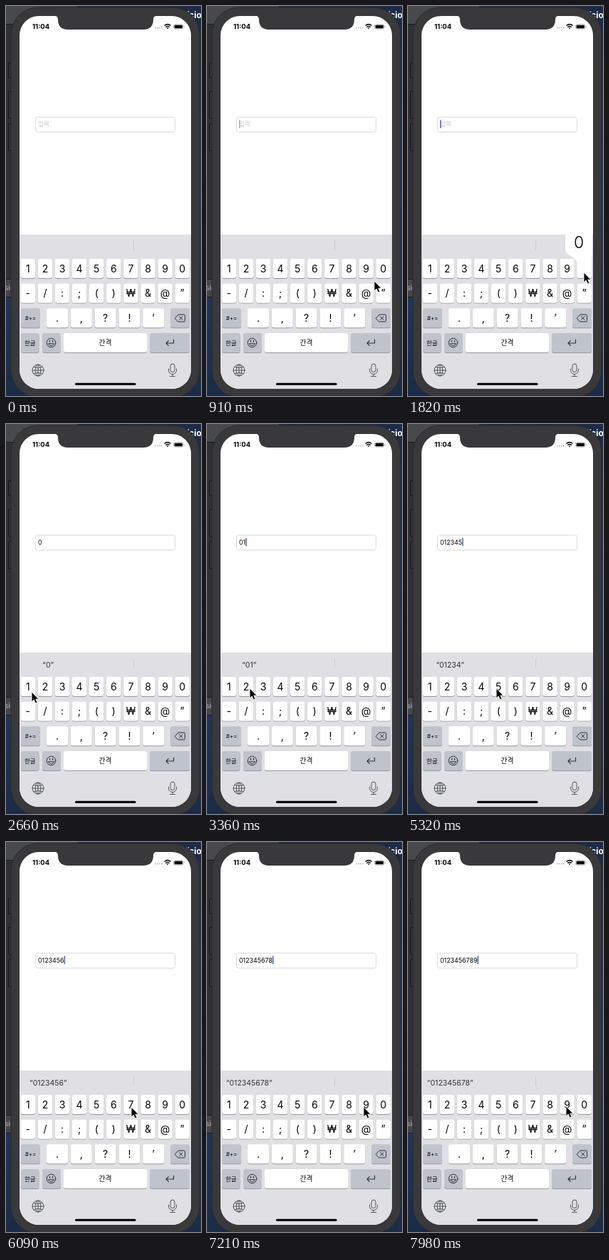
Write an HTML page that moves like this. It is 274 px wide and 546 px high and loops after 8 s.

```html
<!DOCTYPE html>
<html lang="ko">
<head>
<meta charset="utf-8">
<title>Keyboard input</title>
<style>
  html, body { margin: 0; width: 100%; height: 100%; overflow: hidden; background: #1e2d49; }
  svg { display: block; width: 274px; height: 546px; }
  text { font-family: Inter, "Noto Sans CJK KR", "Noto Sans CJK", sans-serif; fill: #050505; }
  .mid { text-anchor: middle; }
  .line { fill: none; stroke: #303236; stroke-linecap: round; stroke-linejoin: round; }
</style>
</head>
<body>
<svg viewBox="0 0 274 546">
  <defs>
    <linearGradient id="desk" x2="0" y2="1">
      <stop offset="0" stop-color="#1d2a48"/><stop offset=".5" stop-color="#28406a"/><stop offset="1" stop-color="#1b2b47"/>
    </linearGradient>
    <clipPath id="screen"><rect x="19" y="14" width="241" height="522" rx="27"/></clipPath>
  </defs>

  <!-- desktop and window behind the phone -->
  <rect width="274" height="546" fill="url(#desk)"/>
  <rect width="100" height="408" fill="#303133"/>
  <rect width="100" height="25" fill="#48494b"/>
  <path d="M0 25.5H20M0 382.5H20M0 407.5H20" stroke="#18191b"/>
  <rect y="383" width="20" height="24" fill="#45464a"/>
  <text x="-2" y="398" font-size="10" style="fill:#b9babc">sig</text>
  <text x="254" y="17" font-size="12" font-weight="700" style="fill:#fff">ício</text>

  <!-- phone body -->
  <g fill="#333436" stroke="#111214">
    <rect x="3.5" y="79.5" width="6" height="21" rx="1"/>
    <rect x="3.5" y="119.5" width="6" height="38" rx="1"/>
    <rect x="3.5" y="164.5" width="6" height="38" rx="1"/>
  </g>
  <rect x="7" y="2" width="265" height="546" rx="38" fill="#39393b" stroke="#29292b"/>

  <g clip-path="url(#screen)">
    <rect x="19" y="14" width="241" height="522" fill="#fff"/>
    <path d="M67 13C72 14 73 16 73 19C73 28 78 33 87 33H193C202 33 207 28 207 19C207 16 208 14 213 13Z" fill="#39393b"/>
    <text x="37" y="32" font-size="9.5" font-weight="700">11:04</text>
    <path d="M209 30.5h11" stroke="#aaa" stroke-width="1.5" stroke-dasharray="1.5 1.5"/>
    <g fill="none" stroke="#111" stroke-width="1.5">
      <path d="M222.5 27.5Q227 23.8 231.5 27.5M224.3 29.6Q227 27.4 229.7 29.6"/>
      <path d="M227 30.3v1.7"/>
    </g>
    <rect x="235.5" y="25.8" width="13.5" height="6.4" rx="2" fill="none" stroke="#999" stroke-width=".7"/>
    <rect x="236.6" y="26.8" width="11.3" height="4.4" rx="1" fill="#000"/>
    <path d="M250 28v2" stroke="#999"/>

    <rect x="41.5" y="155.5" width="196" height="21" rx="3" fill="#fff" stroke="#dcdcde"/>
    <text id="placeholder" x="45" y="168" font-size="8.5" style="fill:#c5c5c8">입력</text>
    <text id="typed" x="45" y="168.6" font-size="8.9"></text>
    <rect id="caret" y="159.5" width="1.5" height="11.5" fill="#4964c8"/>

    <rect x="19" y="320" width="241" height="216" fill="#e0e0e4"/>
    <path d="M179.5 328v14" stroke="#cbccd0"/>
    <text id="suggestion" class="mid" x="59.3" y="340.5" font-size="10.5" style="fill:#333437"></text>
    <g id="keys"></g>

    <g class="line">
      <path d="M237.5 437l4.5-5h8q1.500 0 1.500 1.500v7q0 1.500-1.500 1.500h-8zM243.500 434.700l4.600 4.600m0-4.600l-4.600 4.600"/>
      <path d="M235.500 467v5H225m3.300-3.300L225 472l3.300 3.300" stroke-width="1.200"/>
      <circle cx="63.500" cy="471.500" r="6.300"/>
      <path d="M59.500 473Q63.500 479 67.500 473Z"/>
      <path d="M61.500 468.500v1.500M65.500 468.500v1.500" stroke-width="1.300"/>
      <g stroke="#55575c">
        <circle cx="45" cy="510" r="8"/>
        <ellipse cx="45" cy="510" rx="3.800" ry="8"/>
        <path d="M45 502v16M37 510h16M39 505.500q6 2.500 12 0M39 514.500q6-2.500 12 0"/>
        <rect x="231" y="501" width="6" height="11.500" rx="3"/>
        <path d="M228.500 508v2a5.500 5.500 0 0 0 11 0v-2M234 515.500v3M230.500 518.500h7"/>
      </g>
    </g>
    <rect x="97" y="527.800" width="85.500" height="3" rx="1.500" fill="#000"/>

    <g id="popup">
      <path id="bubble" fill="#fff"/>
      <text id="bubbleDigit" class="mid" y="339" font-size="23" font-weight="300"></text>
    </g>
  </g>
  <path id="cursor" d="M0 0V14L3.200 11.100L5.500 16L8 14.900L5.800 10.200H10Z" fill="#000" stroke="#fff" stroke-width=".9"/>
</svg>

<script>
const LOOP = 8000, STEP = 70, HOLD = 140, SUGGEST_DELAY = 250;
const $ = id => document.getElementById(id);

// Key-down time of each digit 0-9
const presses = [1750, 2800, 3430, 4200, 4620, 5180, 5670, 6230, 6790, 7770];

// Pointer path: time, x, y
const pointer = [
  [0, 290, 400], [770, 290, 400], [910, 235, 385], [980, 210, 376],
  [1120, 210, 376], [1260, 262, 374], [1400, 247, 373], [2030, 247, 373],
  [2380, 50, 376], [2660, 36, 375], [2940, 36, 374], [3010, 60, 370],
  [3640, 60, 370], [3850, 83, 372], [4270, 83, 372], [4410, 98, 368],
  [4830, 98, 368], [4970, 124, 370], [5390, 124, 370], [5600, 150, 371],
  [5880, 150, 371], [6020, 176, 371], [6440, 176, 371], [6650, 200, 371],
  [7000, 200, 371], [7200, 220, 371], [7770, 220, 371], [7840, 222, 370], [LOOP, 222, 370]
];

const keyCenter = i => 30.8 + 24.1 * i;

function key(x, y, width, label = "", size = 14, fill = "#fff") {
  const box = (top, color) =>
    `<rect x="${x}" y="${top}" width="${width}" height="27" rx="3" fill="${color}"/>`;
  const baseline = y + 13.5 + size * 0.36;
  return box(y + 0.9, "#96989d") + box(y, fill) +
    `<text class="mid" x="${x + width / 2}" y="${baseline}" font-size="${size}">${label}</text>`;
}

function drawKeys() {
  const gray = "#bfc3cc";
  const row = (labels, y) => labels.map((c, i) => key(keyCenter(i) - 10.2, y, 20.4, c)).join("");
  $("keys").innerHTML =
    row([..."1234567890"], 354) +
    row(["-", "/", ":", ";", "(", ")", "₩", "&amp;", "@", "”"], 388.7) +
    [".", ",", "?", "!", "’"].map((c, i) => key(57 + 33.8 * i, 423.3, 30, c)).join("") +
    key(21, 423.3, 27, "#+=", 8, gray) + key(231, 423.3, 27, "", 8, gray) +
    key(21, 458, 25.5, "한글", 8.5, gray) + key(51, 458, 26, "", 8, gray) +
    key(81, 458, 117, "간격", 9.8) + key(202, 458, 56, "", 8, gray);
}

function showPopup(digit) {
  $("popup").style.display = digit < 0 ? "none" : "";
  if (digit < 0) return;
  const center = keyCenter((digit + 9) % 10);
  const left = Math.max(20, Math.min(221, center - 19)), right = left + 38;
  const keyLeft = center - 10.2, keyRight = center + 10.2;
  $("bubble").setAttribute("d",
    `M${left} 320H${right}V341C${right} 350 ${keyRight} 351 ${keyRight} 360V378q0 3-3 3` +
    `H${keyLeft + 3}q-3 0-3-3V360C${keyLeft} 351 ${left} 350 ${left} 341Z`);
  $("bubbleDigit").setAttribute("x", (left + right) / 2);
  $("bubbleDigit").textContent = digit;
}

function pointerAt(t) {
  const i = pointer.findIndex(p => p[0] > t);
  const [t0, x0, y0] = pointer[i - 1], [t1, x1, y1] = pointer[i];
  const u = (t - t0) / (t1 - t0), e = u * u * (3 - 2 * u);
  return [x0 + (x1 - x0) * e, y0 + (y1 - y0) * e];
}

function caretOpacity(age) {
  const p = ((age % 1000) + 1000) % 1000;
  if (p < 500) return 1;
  return p < 850 ? Math.max(0, 1 - (p - 500) / 150) : (p - 850) / 150;
}

function render(t) {
  const digitsBy = time => "0123456789".slice(0, presses.filter(p => p + HOLD <= time).length);
  const typed = digitsBy(t), suggested = digitsBy(t - SUGGEST_DELAY);
  $("typed").textContent = typed;
  $("placeholder").style.display = typed ? "none" : "";
  $("suggestion").textContent = suggested && `“${suggested}”`;

  const lastInput = typed ? presses[typed.length - 1] + HOLD : 340;
  $("caret").setAttribute("x", 45 + (typed ? $("typed").getComputedTextLength() : 0));
  $("caret").setAttribute("opacity", caretOpacity(t - lastInput));

  showPopup(presses.findIndex(p => t >= p && t < p + HOLD));
  $("cursor").setAttribute("transform", `translate(${pointerAt(t)})`);
}

drawKeys();
const start = performance.now();
function tick() {
  const t = (performance.now() - start) % LOOP;
  render(Math.floor(t / STEP) * STEP);
  requestAnimationFrame(tick);
}
tick();
</script>
</body>
</html>
```
